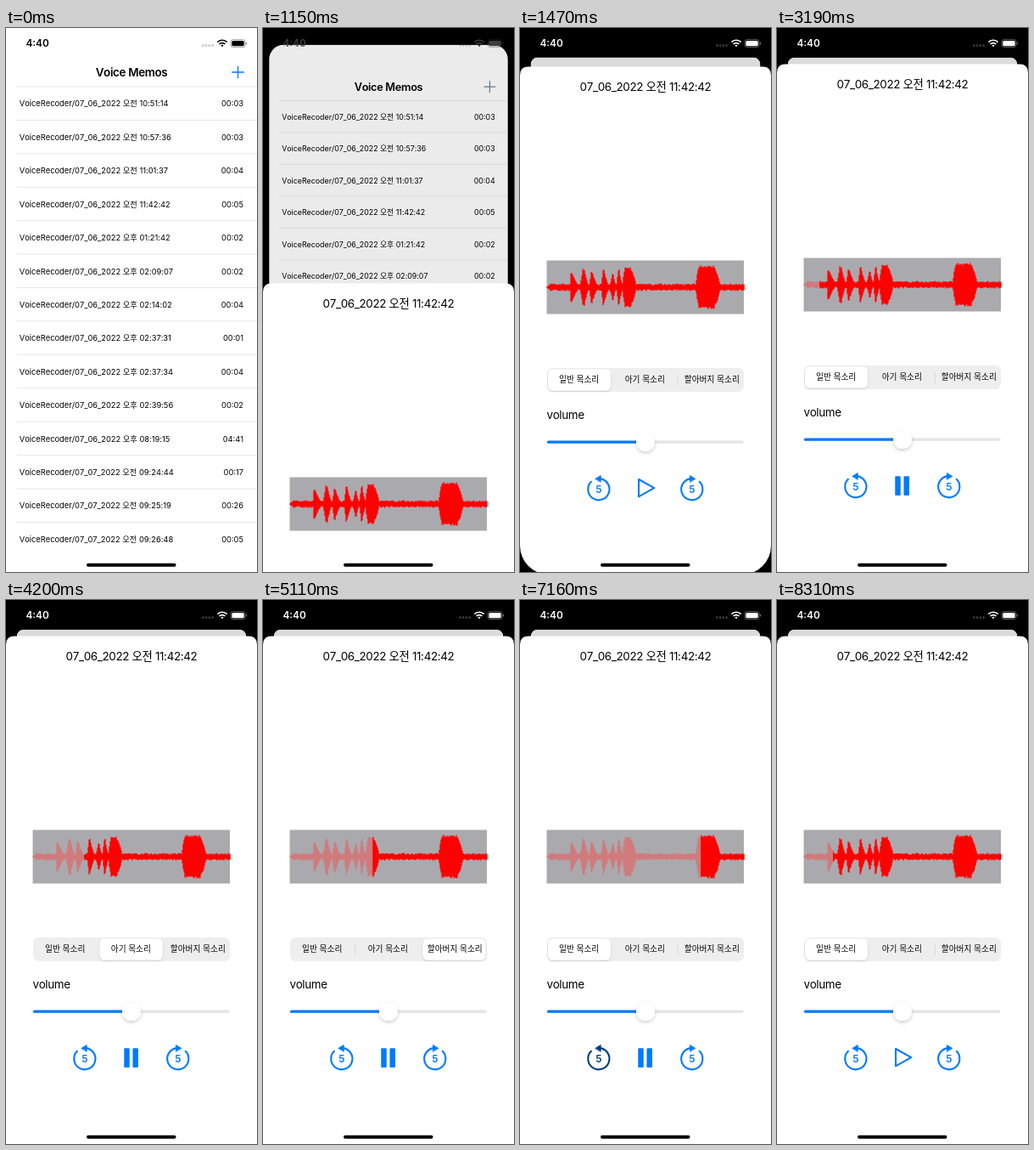
These frames come from a looping animation (296x640 px, 8380 ms). An HTML page:

```html
<!DOCTYPE html>
<html lang="ko">
<head>
<meta charset="utf-8">
<title>Voice Memos</title>
<style>
  html, body { margin: 0; width: 100%; height: 100%; overflow: hidden; background: #000; }
  svg { display: block; width: 296px; height: 640px; }
  text { font-family: Inter, "Noto Sans CJK KR", "Noto Sans CJK", "Noto Sans", sans-serif; font-kerning: none; fill: #000; }
  .row { font-size: 9.3px; }
  .title { font-size: 13.4px; letter-spacing: -.34px; }
  .seg { font-size: 9.7px; text-anchor: middle; }
  .five { font-size: 11.8px; font-weight: 600; text-anchor: middle; stroke: none; fill: currentColor; }
  .icon { color: #007aff; fill: none; stroke: currentColor; stroke-width: 2.1; stroke-linecap: round; stroke-linejoin: round; }
  .clock { font-size: 11.8px; font-weight: 600; fill: currentColor; }
</style>
</head>
<body>
<svg viewBox="0 0 296 640">
  <defs>
    <clipPath id="cardClip"><rect id="cardShape" width="296" height="640"/></clipPath>
    <clipPath id="restClip"><rect id="rest" y="220" width="240" height="80"/></clipPath>
    <filter id="soft" x="-50%" y="-50%" width="200%" height="220%">
      <feDropShadow dx="0" dy="2" stdDeviation="2" flood-opacity=".2"/>
    </filter>
    <filter id="lift" x="-10%" y="-20%" width="120%" height="150%">
      <feDropShadow dx="0" dy="1" stdDeviation="1.2" flood-opacity=".18"/>
    </filter>
  </defs>
  <rect width="296" height="640"/>

  <g id="card" clip-path="url(#cardClip)">
    <rect width="296" height="640" fill="#fff"/>
    <text class="title" x="148" y="56.8" text-anchor="middle" font-weight="600">Voice Memos</text>
    <path id="plus" d="M266.2 52H280.8M273.5 44.7V59.3" fill="none" stroke-width="1.3"/>
    <g id="list"></g>
    <rect id="dim" width="296" height="640"/>
  </g>

  <g id="sheet">
    <path id="paper" fill="#fff"/>
    <text class="title" x="148" y="28" text-anchor="middle">07_06_2022 오전 11:42:42</text>
    <rect x="31.5" y="227.5" width="232.5" height="63" fill="#aaaaae"/>
    <path id="played" stroke="#d07a7c" stroke-width="1.15"/>
    <path id="ahead" stroke="#f00" stroke-width="1.15" clip-path="url(#restClip)"/>

    <rect x="32" y="354" width="232" height="28" rx="6.5" fill="#eeeeef"/>
    <path class="split" d="M108.7 361V375" stroke="#d5d5d8" stroke-width=".8"/>
    <path class="split" d="M186.3 361V375" stroke="#d5d5d8" stroke-width=".8"/>
    <rect id="pill" y="355.5" width="74" height="25" rx="5.3" fill="#fff" filter="url(#lift)"/>
    <text class="seg" x="69.7" y="371.3">일반 목소리</text>
    <text class="seg" x="147.3" y="371.3">아기 목소리</text>
    <text class="seg" x="226.3" y="371.3">할아버지 목소리</text>

    <text class="title" x="31.5" y="413.5">volume</text>
    <path d="M33.5 441.2H262" stroke="#e4e4e6" stroke-width="3.2" stroke-linecap="round"/>
    <path d="M33.5 441.2H148" stroke="#007aff" stroke-width="3.2" stroke-linecap="round"/>
    <circle cx="148" cy="441" r="11" fill="#fff" filter="url(#soft)"/>

    <g class="icon" id="back" transform="translate(92.8 496.7)">
      <path d="M-8.9 -8.9A12.6 12.6 0 1 0 0 -12.6"/>
      <path d="M-3.8 -12.4L2.4 -16.2V-8.6Z" fill="currentColor" stroke-width=".8"/>
      <text class="five" y="4.4">5</text>
    </g>
    <g class="icon" transform="translate(202.8 496.7)">
      <path d="M8.9 -8.9A12.6 12.6 0 1 1 0 -12.6"/>
      <path d="M3.8 -12.4L-2.4 -16.2V-8.6Z" fill="currentColor" stroke-width=".8"/>
      <text class="five" y="4.4">5</text>
    </g>
    <path class="icon" id="play" d="M140 485V505.4L158.2 495.2Z"/>
    <path class="icon" id="pause" d="M140.3 485.3h4.4v20.6h-4.4zM150.5 485.3h4.4v20.6h-4.4z" style="fill:#007aff"/>
  </g>

  <g id="status">
    <text class="clock" x="23.5" y="22.3">4:40</text>
    <g id="dots" fill="currentColor" opacity=".25"></g>
    <g fill="none" stroke="currentColor" stroke-width="1.7">
      <path d="M249.4 16.6A7.8 7.8 0 0 1 260.6 16.6M251.6 19A4.8 4.8 0 0 1 258.4 19"/>
      <path d="M255 22.3L253.4 20.6A2.3 2.3 0 0 1 256.6 20.6Z" fill="currentColor" stroke="none"/>
      <rect x="265" y="13.6" width="17" height="9" rx="2.6" stroke-width=".8" opacity=".45"/>
      <rect x="266.3" y="14.9" width="14.4" height="6.4" rx="1.5" fill="currentColor" stroke="none"/>
      <path d="M283.4 16.8V19.4" stroke-width="1" opacity=".5"/>
    </g>
  </g>
  <rect x="95" y="629.7" width="105.5" height="4" rx="2"/>
</svg>
<script>
const LOOP = 8380, FINAL_TOP = 43;
const $ = id => document.getElementById(id);
const all = sel => [...document.querySelectorAll(sel)];
const set = (el, attrs) => { for (const k in attrs) el.setAttribute(k, attrs[k]); };
const mix = (a, b, p) => a + (b - a) * p;
const clamp = v => Math.max(0, Math.min(1, v));

const memos = [
  '06_2022 오전 10:51:14|00:03', '06_2022 오전 10:57:36|00:03',
  '06_2022 오전 11:01:37|00:04', '06_2022 오전 11:42:42|00:05',
  '06_2022 오후 01:21:42|00:02', '06_2022 오후 02:09:07|00:02',
  '06_2022 오후 02:14:02|00:04', '06_2022 오후 02:37:31|00:01',
  '06_2022 오후 02:37:34|00:04', '06_2022 오후 02:39:56|00:02',
  '06_2022 오후 08:19:15|04:41', '07_2022 오전 09:24:44|00:17',
  '07_2022 오전 09:25:19|00:26', '07_2022 오전 09:26:48|00:05'
];
$('list').innerHTML = memos.map((memo, i) => {
  const [date, length] = memo.split('|'), y = 69 + i * 39.42;
  return `<path d="M12.6 ${y}H296" stroke="#d6d6d8" stroke-width=".6"/>
    <text class="row" x="15.8" y="${y + 23.4}">VoiceRecoder/07_${date}</text>
    <text class="row" x="280" y="${y + 23.4}" text-anchor="end">${length}</text>`;
}).join('');
$('dots').innerHTML = [0, 1, 2, 3].map(i => `<circle cx="${232.3 + i * 3.8}" cy="20.6" r="1.3"/>`).join('');

// Bursts of sound: rise start, full from, full to, fall end, height
const bursts = [
  [59, 60, 61, 71, 18], [70, 74, 76, 82, 22], [81, 84, 85, 93, 19], [95, 98, 99, 106, 21],
  [105, 109, 110, 114, 16], [113, 116, 117, 122, 21], [121, 124, 130, 137, 24], [207.5, 211, 229, 236, 25.5]
];
let seed = 7;
const rand = () => (seed = seed * 16807 % 2147483647) / 2147483647;
function level(x) {
  let h = Math.min(3.2, (x - 31) * .7) * (.7 + rand() * .7);
  for (const [a, b, c, d, top] of bursts) {
    const k = clamp(Math.min((x - a) / (b - a), (d - x) / (d - c)));
    const curve = c - b > 5 ? .6 : 1.4; // long bursts are rounded, short ones pointed
    h = Math.max(h, k ** curve * top * (.88 + rand() * .12));
  }
  return h;
}
let wave = '';
for (let x = 32; x < 264.5; x++) wave += `M${x} ${(259 - level(x)).toFixed(1)}V${(259 + level(x)).toFixed(1)}`;
set($('played'), { d: wave });
set($('ahead'), { d: wave });

// Top edge of the sheet from each moment on
const sheetSteps = [[0, 640], [1040, 625], [1150, 301], [1260, 112], [1360, 61], [1470, 46], [2410, FINAL_TOP]];

function drawSheet(t) {
  const top = sheetSteps.filter(s => s[0] <= t).pop()[1];
  const p = (640 - top) / (640 - FINAL_TOP), s = 1 - .0853 * p;
  const r = top > FINAL_TOP ? 34 : 0;
  set($('sheet'), { transform: `translate(0 ${top})`, visibility: p ? 'visible' : 'hidden' });
  set($('paper'), { d: `M0 9.5Q0 -.4 10 -.4H286Q296 -.4 296 9.5V${597 - r}a${r} ${r} 0 0 1 ${-r} ${r}H${r}a${r} ${r} 0 0 1 ${-r} ${-r}Z` });
  set($('card'), { transform: `translate(${148 * (1 - s)} ${34.7 * p}) scale(${s})` });
  set($('cardShape'), { rx: p ? mix(31, 9, p) : 0 });
  set($('dim'), { opacity: .14 * p });
  const tint = clamp(p * 1.4);
  set($('plus'), { stroke: `rgb(${mix(0, 125, tint)},${mix(122, 138, tint)},${mix(255, 155, tint)})` });
  const ink = Math.round(255 * p ** 2.5);
  $('status').style.color = `rgb(${ink},${ink},${ink})`;
}

const slide = (k, from) => {
  const p = clamp((k - from) / 3);
  return p * p * (3 - 2 * p);
};

function drawPlayer(t) {
  const k = t < 2730 ? -1 : Math.floor((t - 2715) / 113.9);
  const head = k < 0 ? 31 : k < 42 ? 31.4 + 4.66 * k : 66 - 4.66 * (49 - k);
  set($('rest'), { x: head });

  const pos = slide(k, 10) + slide(k, 17) - 2 * slide(k, 27);
  const chosen = Math.round(pos);
  set($('pill'), { x: 33 + pos * 77.8 });
  all('.seg').forEach((el, i) => set(el, { 'font-weight': i === chosen ? 500 : 400 }));
  all('.split').forEach((el, i) => set(el, { opacity: chosen === i || chosen === i + 1 ? 0 : 1 }));

  const playing = k >= 0 && k < 49;
  set($('play'), { visibility: playing ? 'hidden' : 'inherit' });
  set($('pause'), { visibility: playing ? 'inherit' : 'hidden' });
  $('play').style.color = t >= 2540 && t < 2730 ? '#003e82' : '';
  $('back').style.color = k === 39 || k === 40 ? '#003e82' : '';
}

const start = performance.now();
function frame() {
  const t = (performance.now() - start) % LOOP;
  drawSheet(t);
  drawPlayer(t);
  requestAnimationFrame(frame);
}
frame();
</script>
</body>
</html>
```
